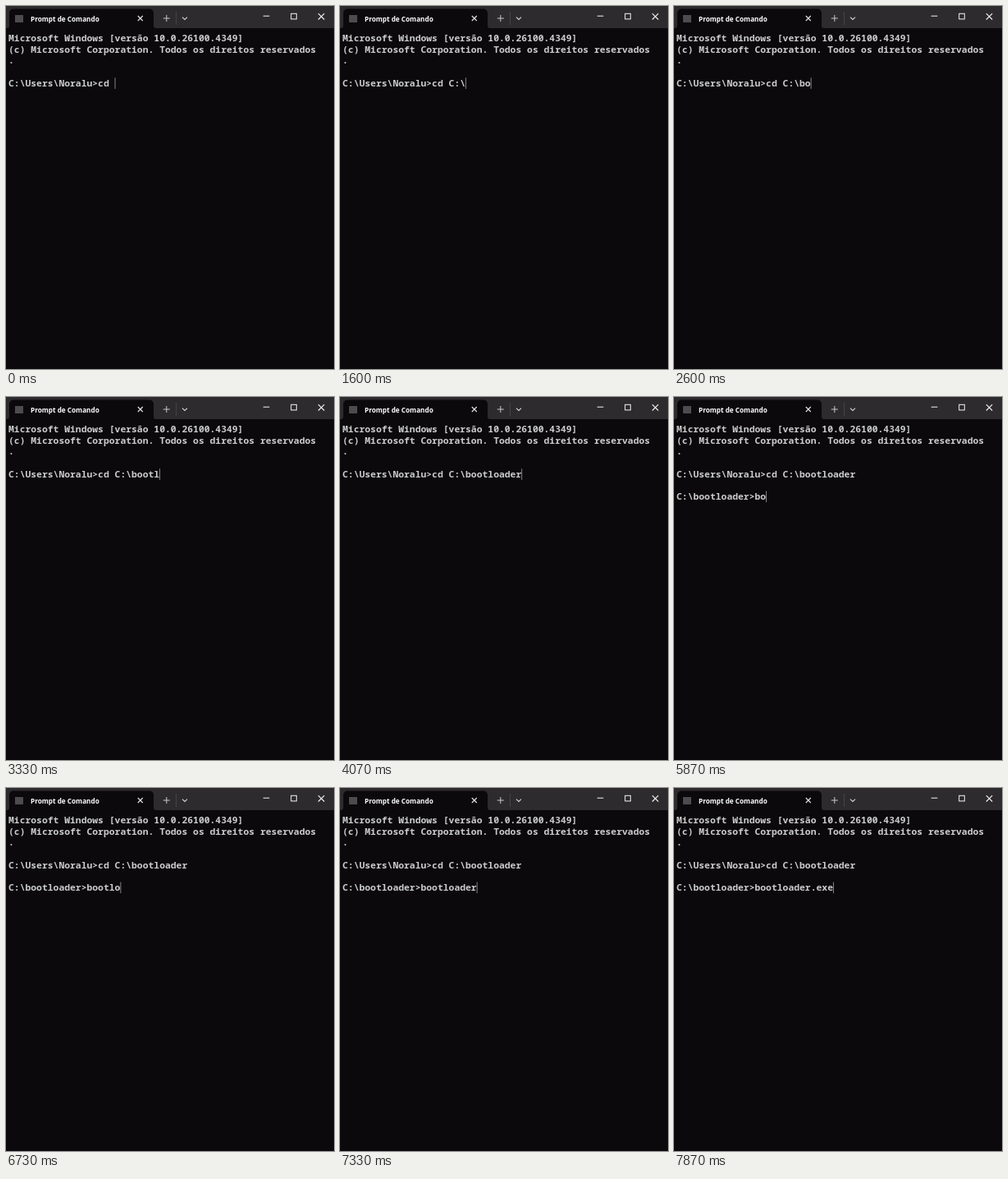
An HTML page with a canvas that plays this animation: 400x442 px, repeating every 8 s.

```html
<!DOCTYPE html>
<html lang="pt-BR">
<head>
<meta charset="utf-8">
<title>Prompt de Comando</title>
<style>
  html, body { margin: 0; width: 100%; height: 100%; overflow: hidden; background: #0b090c; }
  canvas { display: block; width: 400px; height: 442px; }
</style>
</head>
<body>
<canvas id="stage"></canvas>
<script>
const W = 400, H = 442, LOOP = 8000;
const canvas = document.getElementById('stage');
const ctx = canvas.getContext('2d');
const ratio = window.devicePixelRatio || 1;
canvas.width = W * ratio;
canvas.height = H * ratio;
ctx.scale(ratio, ratio);

const BODY = '#0b090c', BAR = '#2d2b2e', INK = '#cccccc', CURSOR = '#919191';
const BAR_H = 27;
const cell = { x: 3, y: 32.7, w: 6.82, h: 13.64, base: 10.5 };

const banner = [
  'Microsoft Windows [versão 10.0.26100.4349]',
  '(c) Microsoft Corporation. Todos os direitos reservados',
  '.'
];
const first = {
  row: 4, prompt: 'C:\\Users\\Noralu>cd ', text: 'C:\\bootloader',
  keys: [330, 870, 1600, 2270, 2600, 2800, 2930, 3330, 3470, 3530, 3730, 3870, 4070]
};
const second = {
  row: 6, prompt: 'C:\\bootloader>', text: 'bootloader.exe',
  keys: [5530, 5870, 6000, 6130, 6600, 6670, 6800, 7000, 7130, 7330, 7400, 7530, 7670, 7870]
};
const ENTER = 4400, CURSOR_BACK = 4600;

function stroke(color, width, ...lines) {
  ctx.strokeStyle = color;
  ctx.lineWidth = width;
  ctx.beginPath();
  for (const points of lines) {
    points.forEach(([x, y], i) => i ? ctx.lineTo(x, y) : ctx.moveTo(x, y));
  }
  ctx.stroke();
}

function cross(x, y, r, color) {
  stroke(color, 1.1, [[x - r, y - r], [x + r, y + r]], [[x - r, y + r], [x + r, y - r]]);
}

function drawTab() {
  const l = 4, r = 180, top = 3.5, c = 5, f = 3;
  ctx.fillStyle = BODY;
  ctx.beginPath();
  ctx.moveTo(l - f, BAR_H);
  ctx.quadraticCurveTo(l, BAR_H, l, BAR_H - f);
  ctx.arcTo(l, top, l + c, top, c);
  ctx.arcTo(r, top, r, top + c, c);
  ctx.lineTo(r, BAR_H - f);
  ctx.quadraticCurveTo(r, BAR_H, r + f, BAR_H);
  ctx.fill();

  ctx.fillStyle = '#4c4b4e';
  ctx.fillRect(11, 11, 10, 9);

  ctx.fillStyle = '#ffffff';
  ctx.font = '700 8.2px "Open Sans", sans-serif';
  ctx.fillText('Prompt de Comando', 30, 18.6);
  cross(163.8, 15, 3, '#e6e6e6');
}

function drawBar() {
  ctx.fillStyle = BAR;
  ctx.fillRect(0, 0, W, BAR_H);
  drawTab();
  stroke('#c8c8c8', 1, [[191.8, 15], [199.8, 15]], [[195.8, 11], [195.8, 19]]);
  stroke('#454347', 1, [[207.5, 7], [207.5, 23]]);
  stroke('#d6d6d6', 1.1, [[215, 13.7], [218, 16.5], [221, 13.7]]);
  stroke('#f4f4f4', 1, [[313.7, 12.2], [321.3, 12.2]]);
  ctx.strokeRect(347.7, 9.3, 6.6, 6.6);
  cross(384.5, 12.8, 3.7, '#f4f4f4');
}

// Every glyph sits in its own terminal cell.
function write(text, row) {
  ctx.fillStyle = INK;
  ctx.font = '600 11.4px "Noto Sans Mono", "DejaVu Sans Mono", monospace';
  const y = cell.y + row * cell.h + cell.base;
  [...text].forEach((ch, i) => ctx.fillText(ch, cell.x + i * cell.w, y));
}

function drawLine({ row, prompt, text, keys }, t, showCursor) {
  const line = prompt + text.slice(0, keys.filter(k => k <= t).length);
  write(line, row);
  if (showCursor) {
    ctx.fillStyle = CURSOR;
    ctx.fillRect(cell.x + line.length * cell.w, cell.y + row * cell.h, 0.9, cell.h);
  }
}

function draw(t) {
  ctx.fillStyle = BODY;
  ctx.fillRect(0, 0, W, H);
  drawBar();
  banner.forEach(write);
  drawLine(first, t, t < ENTER);
  if (t >= ENTER) drawLine(second, t, t >= CURSOR_BACK);
}

const start = performance.now();
function tick() {
  draw((performance.now() - start) % LOOP);
  requestAnimationFrame(tick);
}
tick();
</script>
</body>
</html>
```
